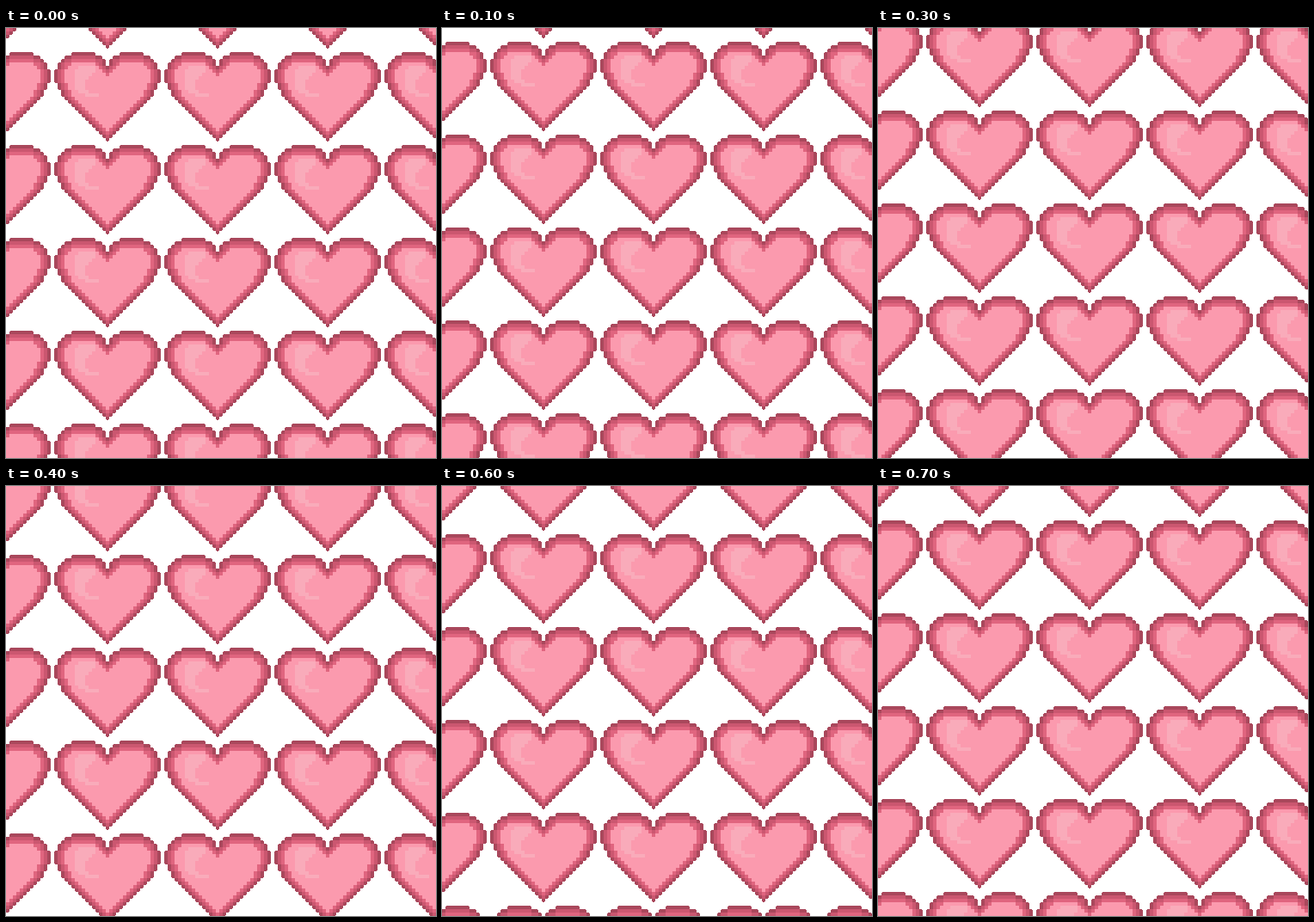
An HTML page with a canvas for the animation above (800 ms loop, 500 by 500 pixels).

```html
<!DOCTYPE html>
<html lang="en">
<head>
<meta charset="utf-8">
<title>Hearts</title>
<style>
html, body { margin: 0; width: 100%; height: 100%; overflow: hidden; background: #fff; }
canvas { display: block; width: 500px; height: 500px; image-rendering: pixelated; }
</style>
</head>
<body>
<canvas id="stage" width="500" height="500"></canvas>
<script>
const CELL = 4, COLS = 31, ROWS = 26, MID = 15;
const STEP_X = 32, STEP_Y = 27;        // tile size in cells
const LOOP = 800, STEPS = 8;
const BANDS = ['#a9485c', '#cb5770', '#e0657f'];
const FILL = '#fb9aae', SHINE = '#f9abba';

// [inner, outer] distance from the middle column for the upper rows
const LOBES = [[4, 10], [2, 12], [1, 13], [1, 14], [0, 14]];

// [row, first column, last column] of the highlight
const GLOSS = [
  [4, 7, 11], [5, 6, 11], [6, 6, 10], [7, 6, 9], [8, 6, 8],
  [9, 6, 8], [10, 6, 8], [11, 7, 9], [12, 9, 12]
];

function inside(x, y) {
  if (y < 0 || y >= ROWS) return false;
  const d = Math.abs(x - MID);
  if (y < LOBES.length) return d >= LOBES[y][0] && d <= LOBES[y][1];
  if (y < 9) return d <= 15;
  return d <= Math.min(14, y < 13 ? 13 + (y < 11) : 25 - y);
}

// steps to the nearest cell outside the heart, at most 4
function depth(x, y) {
  for (let r = 1; r < 4; r++) {
    for (let dx = -r; dx <= r; dx++) {
      const dy = r - Math.abs(dx);
      if (!inside(x + dx, y + dy) || !inside(x + dx, y - dy)) return r;
    }
  }
  return 4;
}

// take one pixel off every outward corner of a cell
function trim(g, x, y) {
  for (const sx of [-1, 1]) {
    for (const sy of [-1, 1]) {
      if (inside(x + sx, y) || inside(x, y + sy)) continue;
      g.clearRect(x * CELL + (sx > 0 ? CELL - 1 : 0), y * CELL + (sy > 0 ? CELL - 1 : 0), 1, 1);
    }
  }
}

function makeHeart() {
  const tile = document.createElement('canvas');
  tile.width = COLS * CELL;
  tile.height = ROWS * CELL;
  const g = tile.getContext('2d');
  for (let y = 0; y < ROWS; y++) {
    for (let x = 0; x < COLS; x++) {
      if (!inside(x, y)) continue;
      g.fillStyle = BANDS[depth(x, y) - 1] || FILL;
      g.fillRect(x * CELL, y * CELL, CELL, CELL);
      trim(g, x, y);
    }
  }
  g.fillStyle = SHINE;
  for (const [y, a, b] of GLOSS) {
    g.fillRect(a * CELL, y * CELL, (b - a + 1) * CELL, CELL);
  }
  return tile;
}

const ctx = document.getElementById('stage').getContext('2d');
const heart = makeHeart();

function draw(now) {
  const step = Math.floor((now % LOOP) / (LOOP / STEPS));
  const shift = Math.round(step * STEP_Y / STEPS);   // whole cells scrolled up
  ctx.fillStyle = '#fff';
  ctx.fillRect(0, 0, 500, 500);
  for (let row = -1; row < 6; row++) {
    for (let col = -1; col < 4; col++) {
      ctx.drawImage(heart, (14 + col * STEP_X) * CELL, (7 - shift + row * STEP_Y) * CELL);
    }
  }
}

const start = performance.now();
function tick() {
  draw(performance.now() - start);
  requestAnimationFrame(tick);
}
tick();
</script>
</body>
</html>
```
